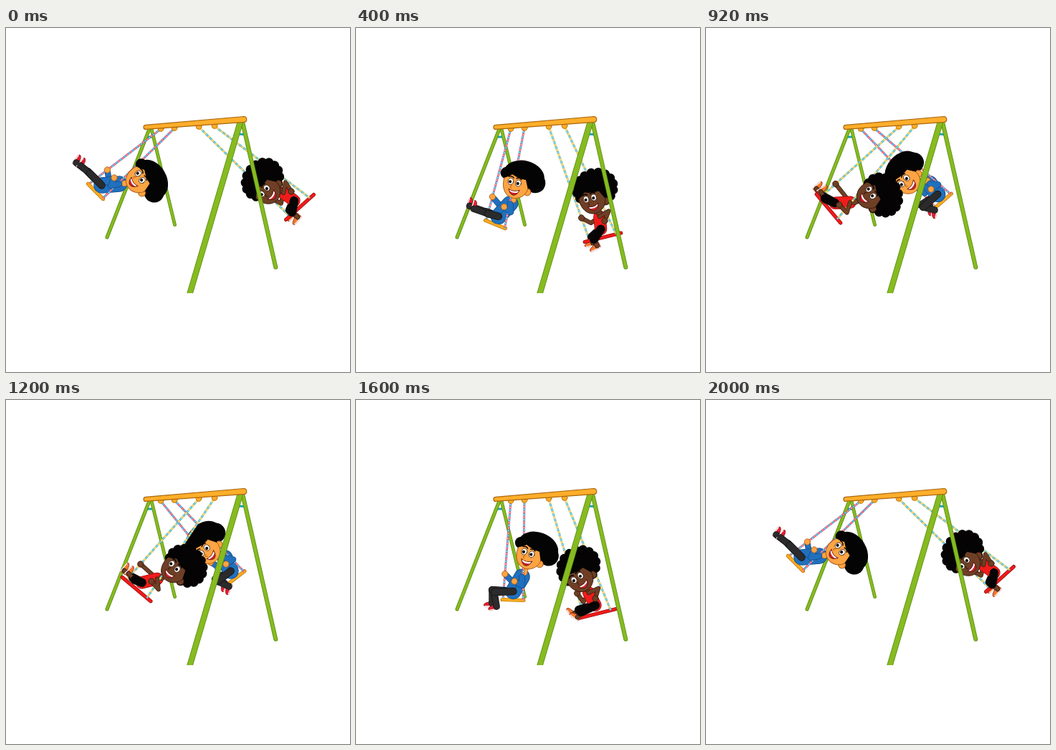
Write an HTML page that moves like this. It is 480 px wide and 480 px high and loops after 2.04 s.

```html
<!DOCTYPE html>
<html lang="en">
<head>
<meta charset="utf-8">
<title>Swings</title>
<style>
html, body { margin: 0; height: 100%; overflow: hidden; background: #fff; }
svg { display: block; width: 100vw; height: 100vh; }
</style>
</head>
<body>
<svg id="stage" viewBox="0 0 480 480" stroke-linecap="round" stroke-linejoin="round">
  <g id="back"></g>
  <g id="boy"></g>
  <g id="girl"></g>
  <g id="front"></g>
</svg>
<script>
const LOOP = 2040, STEP = 40, SWING = 2000;
const $ = id => document.getElementById(id);
const rad = Math.PI / 180;

// Columns: time, seat x y turn, head x y turn, neck x y, knee x y, foot x y, near hand x y
const boy = {
  pivot: [225, 140], knobs: [[216, 141], [235, 140]], chain: ['#e8455a', '#3d8fcb'],
  seatHalf: 15, attach: 14, seatFill: '#f9ab1e', seatEdge: '#b06c0c',
  skin: '#fda443', skinEdge: '#a85a14', top: '#2170bd', topEdge: '#124a86', topWidth: 21,
  sleeve: true, thigh: '#2b2b2d', shin: '#2b2b2d', legWidth: 9, shinWidth: 8,
  shoe: '#e51d2e', farHand: 0.74, armLength: 12, farArm: 15,
  keys: [
    [0,    125, 228,  45,  185, 212,  60,  165, 217,  117, 203,  104, 192,  151, 209],
    [200,  139, 241,  42,  194, 214,  48,  178, 223,  130, 221,  117, 209,  160, 220],
    [560,  254, 279,   1,  248, 218, -15,  261, 239,  240, 267,  221, 270,  258, 253],
    [920,  331, 241, -41,  281, 214, -50,  309, 213,  303, 250,  319, 254,  314, 225],
    [1200, 321, 248, -38,  281, 211, -45,  303, 215,  295, 253,  311, 260,  307, 229],
    [1600, 219, 279,   2,  241, 218,  20,  235, 241,  193, 268,  196, 288,  221, 253]
  ]
};
const girl = {
  pivot: [280, 137], knobs: [[269, 138], [291, 137]], chain: ['#35b4c6', '#e6c24a'],
  seatHalf: 26, attach: 19, seatFill: '#f01a1a', seatEdge: '#8d0d0d',
  skin: '#6e3f25', skinEdge: '#38190b', top: '#f11c1c', topEdge: '#930c0c', topWidth: 16,
  sleeve: false, thigh: '#070505', shin: '#6e3f25', legWidth: 11, shinWidth: 5,
  shoe: '#f5792c', farHand: 0.8, armLength: 15, farArm: 15,
  keys: [
    [0,    410, 250, -42,  365, 228, -50,  383, 227,  399, 257,  407, 264,  398, 228],
    [200,  397, 262, -34,  357, 230, -40,  374, 237,  386, 268,  395, 275,  388, 240],
    [560,  285, 302,   6,  300, 247,  10,  299, 268,  272, 300,  270, 308,  297, 283],
    [920,  171, 252,  50,  228, 234,  60,  207, 243,  166, 238,  160, 228,  186, 247],
    [1200, 182, 264,  40,  234, 237,  45,  217, 248,  180, 251,  171, 242,  203, 253],
    [1600, 337, 298, -14,  313, 250, -35,  322, 264,  314, 296,  309, 303,  334, 277]
  ]
};
const POINTS = [1, 4, 7, 9, 11, 13];

// Points travel on arcs, so they are blended as angle and radius about the pivot.
function toPolar(actor) {
  const [px, py] = actor.pivot;
  actor.polar = actor.keys.map(row => {
    const out = row.slice();
    for (const i of POINTS) {
      out[i] = Math.atan2(row[i] - px, row[i + 1] - py);
      out[i + 1] = Math.hypot(row[i] - px, row[i + 1] - py);
    }
    return out;
  });
  const first = actor.polar[0].slice();
  first[0] = SWING;
  actor.polar.push(first);
}

function slope(rows, k, c) {
  if (k === 0 || k === rows.length - 1) return 0;
  const [a, b, d] = [rows[k - 1], rows[k], rows[k + 1]];
  const h1 = b[0] - a[0], h2 = d[0] - b[0];
  return (h2 * (b[c] - a[c]) / h1 + h1 * (d[c] - b[c]) / h2) / (h1 + h2);
}

function poseAt(actor, t) {
  const rows = actor.polar;
  let k = 0;
  while (k < rows.length - 2 && t >= rows[k + 1][0]) k++;
  const a = rows[k], b = rows[k + 1], h = b[0] - a[0], u = (t - a[0]) / h;
  const v = a.map((_, c) =>
    (1 + 2 * u) * (1 - u) ** 2 * a[c] + u * (1 - u) ** 2 * h * slope(rows, k, c) +
    u * u * (3 - 2 * u) * b[c] + u * u * (u - 1) * h * slope(rows, k + 1, c));
  const point = i => [actor.pivot[0] + v[i + 1] * Math.sin(v[i]), actor.pivot[1] + v[i + 1] * Math.cos(v[i])];
  const [seat, head, neck, knee, foot, hand] = POINTS.map(point);
  return { seat, seatTurn: v[3], head, headTurn: v[6], neck, knee, foot, hand };
}

const mix = (a, b, u) => [a[0] + (b[0] - a[0]) * u, a[1] + (b[1] - a[1]) * u];
const add = (a, x, y) => [a[0] + x, a[1] + y];
const spin = (a, x, y, deg) => {
  const c = Math.cos(deg * rad), s = Math.sin(deg * rad);
  return add(a, x * c - y * s, x * s + y * c);
};
const fix = p => p.map(n => n.toFixed(2)).join(' ');
const place = (p, deg, body) => `<g transform="translate(${fix(p)}) rotate(${deg.toFixed(2)})">${body}</g>`;
const line = (pts, color, width, extra = '') =>
  `<path d="M${pts.map(fix).join('L')}" fill="none" stroke="${color}" stroke-width="${width}" ${extra}/>`;
const limb = (pts, color, edge, width) => line(pts, edge, width + 1.4) + line(pts, color, width);
const dot = (x, y, r, fill, extra = '') => `<circle cx="${x}" cy="${y}" r="${r}" fill="${fill}" ${extra}/>`;
const oval = (x, y, rx, ry, fill, extra = '') =>
  `<ellipse cx="${x}" cy="${y}" rx="${rx}" ry="${ry}" fill="${fill}" ${extra}/>`;
const shape = (d, fill, extra = '') => `<path d="${d}" fill="${fill}" ${extra}/>`;

function chain(from, to, [a, b]) {
  const flat = 'stroke-linecap="butt" stroke-dasharray=';
  return line([from, to], a, 2.9, flat + '"3.6 3.6"') +
    line([from, to], b, 2.9, flat + '"3.6 3.6" stroke-dashoffset="3.6"') +
    line([from, to], '#fff', 1, flat + '"2 1.6" stroke-dashoffset="-.8"');
}

function arm(actor, shoulder, hand, length) {
  const dx = hand[0] - shoulder[0], dy = hand[1] - shoulder[1], d = Math.hypot(dx, dy) || 1;
  const bulge = Math.sqrt(Math.max(0, length * length - d * d / 4));
  const elbow = add(mix(shoulder, hand, 0.5), dy / d * bulge, -dx / d * bulge);
  const wrist = mix(elbow, hand, 0.75);
  const sleeve = actor.sleeve
    ? limb([shoulder, elbow, wrist], actor.top, actor.topEdge, 7)
    : limb([shoulder, elbow, wrist], actor.skin, actor.skinEdge, 4.6);
  return sleeve + dot(...hand, 4.2, actor.skin, `stroke="${actor.skinEdge}" stroke-width=".8"`);
}

function leg(actor, hip, knee, foot) {
  const turn = Math.atan2(foot[1] - knee[1], foot[0] - knee[0]) / rad - 90;
  const shoe = shape('M4-4L4 4-10 4Q-14 2-9-1Q-4-2-2-4Z', actor.shoe, 'stroke="#7d1216" stroke-width=".7"') +
    shape('M4 3.6L-10 3.6', 'none', 'stroke="#fff" stroke-width="1.3"');
  return place(foot, turn, shoe) + limb([knee, foot], actor.shin, '#111', actor.shinWidth) +
    limb([hip, knee], actor.thigh, '#111', actor.legWidth);
}

function afro() {
  let out = oval(8, -16, 28, 24, '#050303');
  for (let i = 0; i < 16; i++) {
    const a = i * Math.PI / 8;
    out += dot((8 + 26 * Math.cos(a)).toFixed(1), (-16 + 22 * Math.sin(a)).toFixed(1), 6.5, '#050303');
  }
  return out;
}
const crop = oval(8, -16, 29, 21, '#040404') + dot(26, -10, 14, '#040404') + dot(-17, -14, 8, '#040404');

function face(actor, hair) {
  const edge = `stroke="${actor.skinEdge}" stroke-width=".9"`;
  const eye = x => oval(x, -4, 3.8, 4.6, '#fff', 'stroke="#2a1408" stroke-width=".7"') + dot(x - .7, -3.4, 2.1, '#160c08') +
    shape(`M${x - 4}-10q4-2.5 7 .3`, 'none', 'stroke="#080402" stroke-width="1.5"');
  return hair + dot(18, 5, 5, actor.skin, edge) +
    shape('M-18-5C-18-23 18-23 18-3C19 10 9 18 0 18C-10 18-18 9-18-5Z', actor.skin, edge) +
    shape('M-19-6Q-13-9-8-14Q2-10 12-11Q15-5 18 1L24-12 4-28-17-18Z', '#040404') +
    eye(-8) + eye(3) +
    shape('M-5 1q-4 3 0 4', 'none', edge) +
    shape('M-8 7Q0 10 7 5Q5 14-1 14Q-6 13-8 7Z', '#c9232b', 'stroke="#4a0d0b" stroke-width=".7"') +
    shape('M-7 7.6Q0 10 6 6L5 9Q-1 12-6 9.6Z', '#fff');
}

function actorArt(actor, hair, t) {
  const p = poseAt(actor, t);
  const end = x => spin(p.seat, x, 0, p.seatTurn);
  const hip = spin(p.seat, 0, -12, p.seatTurn);
  const chest = mix(p.neck, hip, 0.22);
  const farEnd = end(-actor.attach);
  const farHand = mix(actor.knobs[0], farEnd, actor.farHand);
  const farFoot = add(p.foot, -6, -4), farKnee = add(p.knee, -3, -3);
  const seat = limb([end(-actor.seatHalf), end(actor.seatHalf)], actor.seatFill, actor.seatEdge, 3.8);
  const torso = limb([chest, hip], actor.top, actor.topEdge, actor.topWidth);
  const trim = actor.sleeve ? line([chest, hip], actor.topEdge, .8) : '';
  return chain(actor.knobs[0], farEnd, actor.chain) +
    arm(actor, chest, farHand, actor.farArm) +
    leg(actor, hip, farKnee, farFoot) + seat +
    torso + trim + leg(actor, hip, p.knee, p.foot) +
    limb([p.neck, mix(p.neck, p.head, .4)], actor.skin, actor.skinEdge, 7) +
    chain(actor.knobs[1], end(actor.attach), actor.chain) +
    arm(actor, chest, p.hand, actor.armLength) +
    place(p.head, p.headTurn, face(actor, hair));
}

function pole(a, b, width) {
  return line([a, b], '#5a8a12', width) + line([a, b], '#86bb20', width - 1.6);
}

function drawFrame() {
  const brace = (a, b) => line([a, b], '#16a3c4', 3);
  $('back').innerHTML = brace([197, 152], [205, 152]) +
    pole([203, 141], [235.5, 274.5], 4.8) + pole([200, 141], [141, 292], 5);
  const knobs = [...boy.knobs, ...girl.knobs].map(([x, y]) =>
    dot(x, y - .6, 4, '#fbab25', 'stroke="#b06c0c" stroke-width=".8"')).join('');
  $('front').innerHTML = brace([324, 148], [333, 148.5]) +
    pole([330, 131], [376.3, 333.8], 6) +
    `<svg width="480" height="370">${pole([327, 131], [255.5, 374], 8.4)}</svg>` + knobs +
    shape('M195 135.4L332 123.5A4 4 0 0 1 332.6 131.4L195 141.4A3 3 0 0 1 195 135.4Z', '#ffae2a',
      'stroke="#a9660c" stroke-width="1.2"');
}

toPolar(boy);
toPolar(girl);
drawFrame();
const curls = afro();
const start = performance.now();
let shown = -1;

function update() {
  const elapsed = (performance.now() - start) % LOOP;
  const t = Math.min(Math.floor(elapsed / STEP) * STEP, SWING);
  if (t !== shown) {
    shown = t;
    $('boy').innerHTML = actorArt(boy, crop, t);
    $('girl').innerHTML = actorArt(girl, curls, t);
  }
  requestAnimationFrame(update);
}
update();
</script>
</body>
</html>
```
